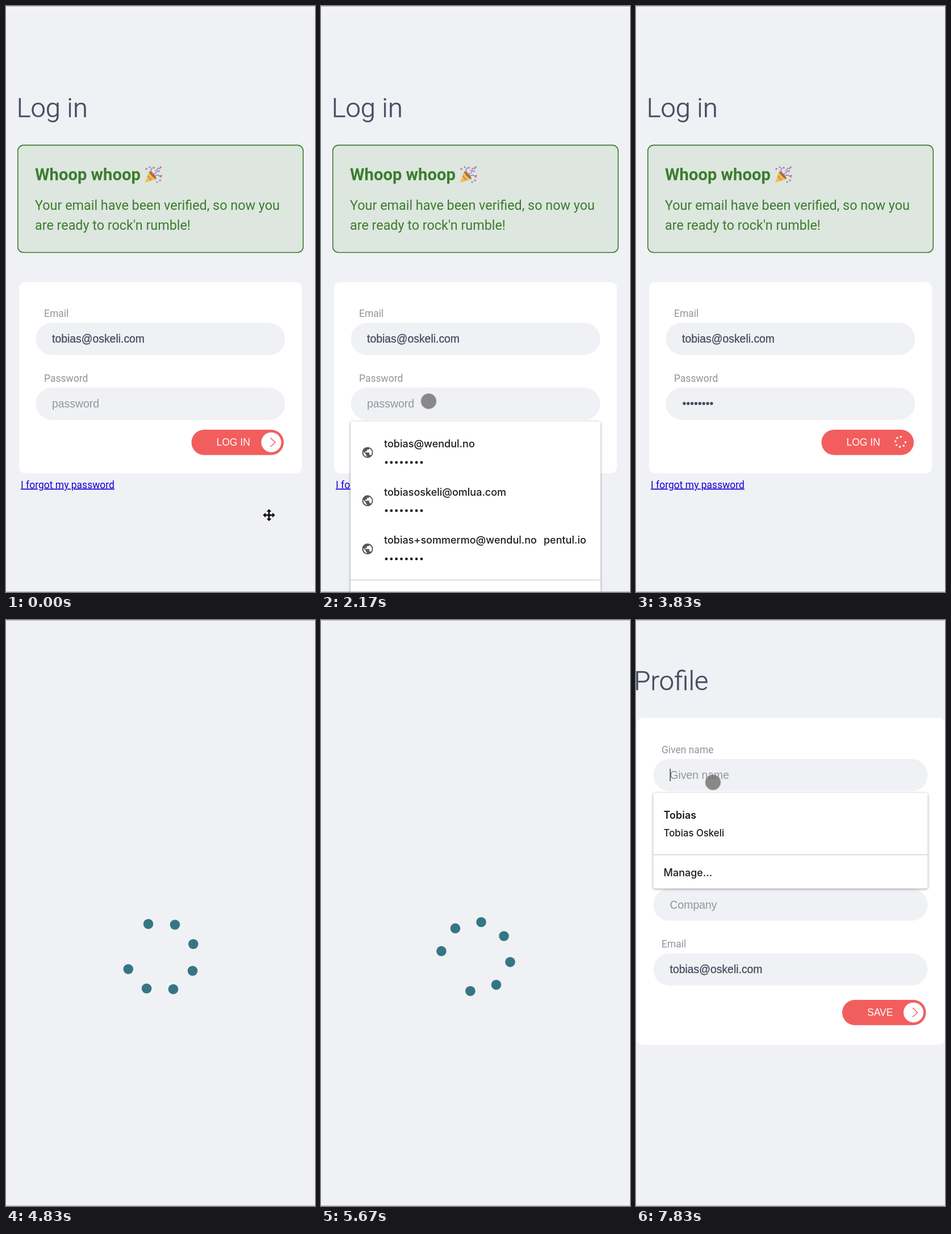
Animation of 544 by 1029 pixels, one loop 8 s. Source, as an HTML page:

```html
<!DOCTYPE html>
<html lang="en">
<head>
<meta charset="utf-8">
<title>Log in and profile</title>
<style>
  html, body { margin: 0; width: 100%; height: 100%; overflow: hidden; background: #f0f1f5; }
  svg { display: block; width: 100%; height: 100%; }
  text { font-family: Roboto, sans-serif; white-space: pre; }
  .title { font-size: 47px; font-weight: 300; fill: #464d60; stroke: #464d60; stroke-width: .5; }
  .head { font-size: 29.2px; font-weight: 600; fill: #3b7d2d; }
  .note { font-size: 23.35px; fill: #3b7d2d; }
  .label { font-size: 17.5px; fill: #8f949c; }
  .link { font-size: 17.5px; fill: #1500d8; text-decoration: underline; }
  .value, .hint { font-family: "Liberation Sans", Arial, sans-serif; font-size: 19.4px; }
  .value { fill: #454c60; stroke: #454c60; stroke-width: .3; }
  .hint { fill: #8f979d; }
  .button { font-family: "Liberation Sans", Arial, sans-serif; font-size: 17.5px; fill: #fff; }
  .item, .small { font-family: Inter, sans-serif; font-size: 18px; font-weight: 500; fill: #1c1c1e; }
  .small { font-size: 16.8px; }
  .strong { font-weight: 600; }
  .popup { filter: drop-shadow(0 1px 2px rgba(0, 0, 0, .4)); }
</style>
</head>
<body>
<svg id="stage" viewBox="0 0 544 1029" preserveAspectRatio="none"></svg>
<script>
const LOOP = 8000, STEPS_PER_SECOND = 6;
const BG = '#f0f1f5', RED = '#f25e5e', TEAL = '#367684', INK = '#454c60';
const EMAIL = 'tobias@oskeli.com';

// Scene changes, counted in steps
const POPUP_OPEN = 8, POPUP_CLOSE = 17, BUSY = 21, LOADING = 27, PROFILE = 37, SUGGEST = 47;

// Pointer paths: [step, x, y]; the pointer is hidden between paths
const PATHS = [
  [[1, 463, 894], [3, 463, 894], [4, 338, 804], [5, 215.5, 716], [7, 190, 694.5],
   [13, 189.5, 694], [16, 205, 850], [17, 208, 853], [19, 395, 768], [20, 402, 766]],
  [[40, 115, 481], [41, 120, 410], [42, 127, 345], [43, 133, 302], [44, 138, 287], [47, 135.5, 285]]
];

const text = (cls, x, y, str) => `<text class="${cls}" x="${x}" y="${y}">${str}</text>`;
const rect = (x, y, w, h, r, fill, more = '') =>
  `<rect x="${x}" y="${y}" width="${w}" height="${h}" rx="${r}" fill="${fill}" ${more}/>`;
const dot = (x, y, r, fill, more = '') => `<circle cx="${x}" cy="${y}" r="${r}" fill="${fill}" ${more}/>`;
const path = (d, fill, more = '') => `<path d="${d}" fill="${fill}" ${more}/>`;
const at = (x, y, content) => `<g transform="translate(${x} ${y})">${content}</g>`;
const repeat = (n, draw) => Array.from({ length: n }, (_, i) => draw(i)).join('');
const bullets = (x, y, gap, r, fill) => repeat(8, i => dot(x + i * gap, y, r, fill));

function field(x, y, w, label, content) {
  return text('label', x + 14.5, y - 10, label) + rect(x, y, w, 56.5, 28.2, BG) + content;
}

// Eight places on a circle, the one at the gap angle left empty
function spinner(x, y, radius, size, fill, gap) {
  return repeat(7, i => {
    const a = (gap + (i + 1) * 45) * Math.PI / 180;
    return dot(x + radius * Math.cos(a), y + radius * Math.sin(a), size, fill);
  });
}

function button(x, y, w, label, busyAngle) {
  const cx = x + w - 22, cy = y + 22.2;
  const icon = busyAngle === null
    ? dot(cx, cy, 17.5, '#fff') + path(`M${cx - 1.5} ${cy - 8}l8.5 8l-8.5 8`, 'none', `stroke="${RED}" stroke-width="1.5"`)
    : spinner(cx - 1.5, cy - 1, 8.8, 1.7, '#fff', busyAngle);
  return rect(x, y, w, 44.4, 22.2, RED) + text('button', x + 44, y + 28, label) + icon;
}

function popper() {
  const bits = [[3, 5, '#e0559b'], [9, 2, '#58a6dc'], [16, 3, '#d8549a'], [28, 2, '#e0559b'],
    [25, 9, '#4f9fe0'], [29, 17, '#e46b4e'], [27, 25, '#cf58a8'], [22, 28, '#58a6dc'], [19, 8, '#f0b43c']];
  return at(244, 281,
    path('M1 29L8 9Q19 13 21 23Z', '#f6bf3c') +
    path('M5.5 17l6.5 8', 'none', 'stroke="#b177c9" stroke-width="1.8"') +
    `<ellipse cx="14.5" cy="16" rx="2.3" ry="9" transform="rotate(-43 14.5 16)" fill="#a0703f"/>` +
    path('M14 13Q9 7 13 4M16 14Q23 12 22 6Q23 2 27 5M19 17Q24 14 29 20', 'none',
      'stroke="#a873cd" stroke-width="1.6" stroke-linecap="round"') +
    bits.map(([x, y, c]) => rect(x - 1.3, y - 1.3, 2.8, 2.8, .6, c)).join(''));
}

function globe(x, y) {
  return at(x, y, dot(0, 0, 9.6, '#55575a') +
    path('M-1 7.6Q-7.8 6.3 -7.5 -1.7L-3 3V4Q-3 6 -1 6Z' +
      'M5.7 5.2Q5.2 4 4 4H3V1Q3 0 2 0H-4V-2H-2Q-1 -2 -1 -3V-5H1Q3 -5 3 -7Q7.6 -4.8 7.7 0Q7.6 3.2 5.7 5.2Z', '#fff'));
}

function passwordPopup() {
  const accounts = ['tobias@wendul.no', 'tobiasoskeli@omlua.com',
    'tobias+sommermo@wendul.no<tspan dx="12">pentul.io</tspan>'];
  return rect(52, 729.5, 440, 320, 4, '#fff', 'class="popup"') +
    accounts.map((name, i) => {
      const y = 775 + i * 84.7;
      return globe(82, y + 9) + text('item', 111, y, name) + bullets(115, y + 26.5, 8.85, 2.4, '#1c1c1e');
    }).join('') +
    rect(52, 1007, 440, 1.5, 0, '#d2d3d5');
}

function loginPage(step) {
  const filled = step >= POPUP_CLOSE;
  const busyAngle = step >= BUSY ? -40 + (step - 23) * 60 : null;
  return rect(0, 1, 544, 12, 0, '#f3f3f3') +
    text('title', 18.7, 195, 'Log in') +
    rect(20.8, 244.4, 502.4, 188.4, 10, '#dde6df', 'stroke="#3b7d2d" stroke-width="1.6"') +
    text('head', 51, 306, 'Whoop whoop') + popper() +
    text('note', 51, 357.5, 'Your email have been verified, so now you') +
    text('note', 51, 392.5, "are ready to rock'n rumble!") +
    rect(23, 485, 498, 335.5, 10, '#fff') +
    field(52.5, 556.3, 439, 'Email', text('value', 81, 591, EMAIL)) +
    field(52.5, 670.3, 439, 'Password',
      filled ? bullets(85, 698, 6.85, 2.7, INK) : text('hint', 81, 705, 'password')) +
    button(326.5, 744, 162.5, 'LOG IN', busyAngle) +
    text('link', 26, 846.5, 'I forgot my password') +
    (step >= POPUP_OPEN && step < POPUP_CLOSE ? passwordPopup() : '');
}

function namePopup() {
  return rect(59.6, 261, 1.4, 22, 0, '#333') +
    rect(30.5, 303.5, 483, 168, 4, '#fff', 'class="popup"') +
    text('item strong', 48.5, 349, 'Tobias') +
    text('small', 48.5, 379.5, 'Tobias Oskeli') +
    rect(30.5, 411.5, 483, 1.5, 0, '#d2d3d5') +
    text('item', 48.5, 449.5, 'Manage...');
}

function profilePage(step) {
  const rows = ['Given name', 'Family name', 'Company', 'Email'];
  return text('title', -3.5, 123, 'Profile') +
    rect(1, 172, 542.5, 574, 10, '#fff') +
    rows.map((label, i) => {
      const y = 244 + i * 113.8, isEmail = label === 'Email';
      return field(30.5, y, 483, label,
        text(isEmail ? 'value' : 'hint', 59.5, y + 35, isEmail ? EMAIL : label));
    }).join('') +
    button(363, 667, 147.5, 'SAVE', null) +
    (step >= SUGGEST ? namePopup() : '');
}

function moveCursor() {
  const arm = 'M-1.5 0V-6H-4.5L0 -10.8L4.5 -6H1.5V0Z';
  const arms = repeat(4, i => path(arm, '#111', `transform="rotate(${i * 90})"`));
  return at(463, 894, `<g stroke="#fff" stroke-width="2">${arms}</g>` + arms + rect(-1.5, -1.5, 3, 3, 0, '#111'));
}

function pointer(step) {
  if (step < 1) return moveCursor();
  const points = PATHS.find(p => step >= p[0][0] && step <= p.at(-1)[0]);
  if (!points) return '';
  const next = Math.max(1, points.findIndex(p => p[0] >= step));
  const [s0, x0, y0] = points[next - 1], [s1, x1, y1] = points[next];
  const k = (step - s0) / (s1 - s0);
  return dot(x0 + (x1 - x0) * k, y0 + (y1 - y0) * k, 13.6, '#707070',
    'fill-opacity=".82" stroke="#b4b4b4" stroke-width="1"');
}

function scene(step) {
  const page = step < LOADING ? loginPage(step)
    : step < PROFILE ? spinner(272.5, 591, 61.3, 8.8, TEAL, -36 + (step - 31) * 60)
    : profilePage(step);
  return rect(0, 0, 544, 1029, 0, BG) + page + pointer(step) +
    rect(0, 0, 544, 1, 0, '#b4b4b6') + rect(0, 1028, 544, 1, 0, '#b4b4b6');
}

const stage = document.getElementById('stage');
let start = null, shown = -1;
function frame(now) {
  start ??= now;
  // A small lead keeps rounded sample times on the right step
  const step = Math.floor(((now - start) % LOOP) / 1000 * STEPS_PER_SECOND + .05) % 48;
  if (step !== shown) stage.innerHTML = scene(shown = step);
  requestAnimationFrame(frame);
}
stage.innerHTML = scene(0);
requestAnimationFrame(frame);
</script>
</body>
</html>
```
